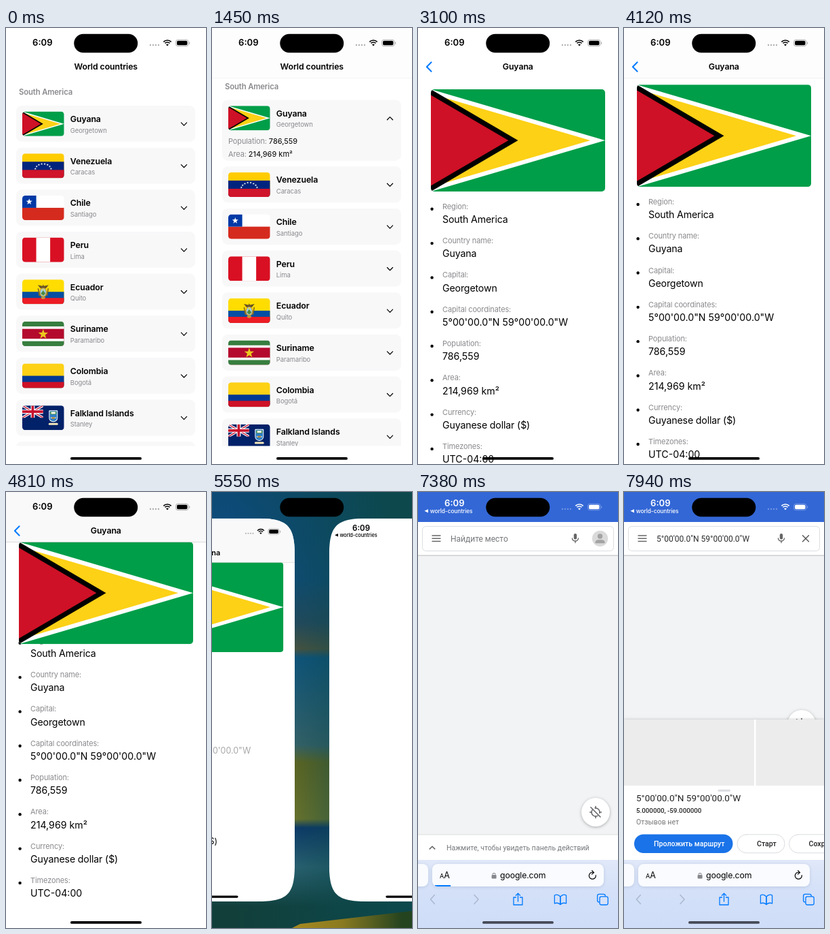
Recreate the animation shown at these times as an HTML page with a canvas. Size 295 by 640 pixels, loop 8 s.

```html
<!DOCTYPE html>
<html lang="en">
<head>
<meta charset="utf-8">
<title>World countries</title>
<style>
  html, body { margin: 0; width: 100%; height: 100%; overflow: hidden; background: #fff; }
  canvas { display: block; width: 295px; height: 640px; }
</style>
</head>
<body>
<canvas id="stage"></canvas>
<script>
const W = 295, H = 640, LOOP = 8000;
const canvas = document.getElementById('stage');
const dpr = window.devicePixelRatio || 1;
canvas.width = W * dpr;
canvas.height = H * dpr;
const c = canvas.getContext('2d');

const BLUE = '#007aff', GRAY = '#8a8a8e', INK = '#000';
const COORDS = '5°00\'00.0"N 59°00\'00.0"W';
const SANS = 'Inter, "Liberation Sans", sans-serif';
const ROBOTO = 'Roboto, "Liberation Sans", sans-serif';

// ---------- helpers ----------
const mix = (a, b, p) => a + (b - a) * p;
const clamp = v => Math.max(0, Math.min(1, v));
const easeOut = (p, n = 3) => 1 - Math.pow(1 - p, n);
const easeInOut = p => p * p * (3 - 2 * p);

// Number of steps (0..n) taken by time t, the first at a and the last at b.
function steps(t, a, b, n) {
  if (t < a) return 0;
  return Math.min(n, Math.floor((t - a) / (b - a) * (n - 1) + 0.2) + 1);
}

function rect(x, y, w, h, color) {
  c.fillStyle = color;
  c.fillRect(x, y, w, h);
}
function round(x, y, w, h, r, fill, stroke, lw = 1) {
  c.beginPath();
  c.roundRect(x, y, w, h, r);
  if (fill) { c.fillStyle = fill; c.fill(); }
  if (stroke) { c.strokeStyle = stroke; c.lineWidth = lw; c.stroke(); }
}
function poly(color, ...p) {
  c.beginPath();
  for (let i = 0; i < p.length; i += 2) c.lineTo(p[i], p[i + 1]);
  c.fillStyle = color;
  c.fill();
}
function line(color, lw, ...p) {
  c.beginPath();
  for (let i = 0; i < p.length; i += 2) c.lineTo(p[i], p[i + 1]);
  c.strokeStyle = color;
  c.lineWidth = lw;
  c.stroke();
}
function disc(x, y, r, color) {
  oval(x, y, r, r, color);
}
function oval(x, y, rx, ry, color) {
  c.beginPath();
  c.ellipse(x, y, rx, ry, 0, 0, 7);
  c.fillStyle = color;
  c.fill();
}
function ring(x, y, r, color, lw, a = 0, b = 2 * Math.PI) {
  c.beginPath();
  c.arc(x, y, r, a, b);
  c.strokeStyle = color;
  c.lineWidth = lw;
  c.stroke();
}
function star(x, y, r, color) {
  const p = [];
  for (let i = 0; i < 10; i++) {
    const a = i * Math.PI / 5 - Math.PI / 2, d = i % 2 ? r * 0.4 : r;
    p.push(x + d * Math.cos(a), y + d * Math.sin(a));
  }
  poly(color, ...p);
}
// Numbers are set a little wider than words.
function text(s, x, y, size, color = INK, weight = 400, align = 'left') {
  c.font = `${weight} ${size}px ${SANS}`;
  c.letterSpacing = (/\d\d/.test(s) ? 0 : -0.011 * size) + 'px';
  c.textAlign = align;
  c.fillStyle = color;
  c.fillText(s, x, y);
  return c.measureText(s).width;
}
function webText(s, x, y, size, color, weight = 400) {
  c.font = `${weight} ${size}px ${ROBOTO}`;
  c.letterSpacing = '0px';
  c.textAlign = 'left';
  c.fillStyle = color;
  c.fillText(s, x, y);
}
function scoped(draw) {
  c.save();
  draw();
  c.restore();
}
function shadow(color, blur, dy) {
  c.shadowColor = color;
  c.shadowBlur = blur * dpr;
  c.shadowOffsetY = dy * dpr;
}

// ---------- flags, drawn on a 62 x 36 field ----------
const FW = 62, FH = 36;
const bands = (...b) => {
  let y = 0;
  for (let i = 0; i < b.length; i += 2) {
    rect(0, y * FH, FW, FH - y * FH, b[i]);
    y += b[i + 1];
  }
};
const wedge = (color, top, tip) => poly(color, 0, top * FH, tip * FW, FH / 2, 0, FH - top * FH);

const flags = {
  guyana() {
    rect(0, 0, FW, FH, '#009e49');
    wedge('#fff', 0, 1);
    wedge('#fcd116', 0.043, 0.915);
    wedge('#000', 0, 0.5);
    wedge('#ce1126', 0.056, 0.445);
  },
  venezuela() {
    bands('#fc0', 1 / 3, '#00247d', 1 / 3, '#cf142b', 1 / 3);
    for (let i = 0; i < 8; i++) {
      const a = Math.PI * (1.08 + i * 0.12);
      star(31 + 12 * Math.cos(a), 24.5 + 9.5 * Math.sin(a), 1.7, '#fff');
    }
  },
  chile() {
    bands('#fff', 0.5, '#d52b1e', 0.5);
    rect(0, 0, 20.7, FH / 2, '#0039a6');
    star(10.3, 9.2, 4.8, '#fff');
  },
  peru() {
    rect(0, 0, FW, FH, '#d91023');
    rect(FW / 3, 0, FW / 3, FH, '#fff');
  },
  ecuador() {
    bands('#fd0', 0.5, '#034ea2', 0.25, '#ed1c24', 0.25);
    line('#8a6a1c', 1.6, 23.5, 13, 25.5, 24);
    line('#8a6a1c', 1.6, 38.5, 13, 36.5, 24);
    poly('#6b5426', 23, 8, 30, 9.5, 31, 7, 32, 9.5, 39, 8, 35, 13, 27, 13);
    oval(31, 19, 5.4, 7, '#c9a03a');
    oval(31, 18.6, 4, 5.4, '#9cd0ee');
    poly('#4d8a3c', 27.6, 20.5, 31, 16, 34.4, 20.5, 31, 23.6);
    disc(31, 15, 1.1, '#fd0');
    poly('#c9a03a', 27.5, 26, 34.5, 26, 33, 28.5, 29, 28.5);
  },
  suriname() {
    bands('#377e3f', 0.2, '#fff', 0.1, '#b40a2d', 0.4, '#fff', 0.1, '#377e3f', 0.2);
    star(31, 18.6, 7.6, '#ecc81d');
  },
  colombia() {
    bands('#fcd116', 0.5, '#003893', 0.25, '#ce1126', 0.25);
  },
  falkland() {
    rect(0, 0, FW, FH, '#012169');
    scoped(() => {
      c.beginPath();
      c.rect(0, 0, 31, 18);
      c.clip();
      for (const [color, lw] of [['#fff', 3.6], ['#c8102e', 1.3]]) {
        line(color, lw, 0, 0, 31, 18);
        line(color, lw, 31, 0, 0, 18);
      }
      for (const [color, lw] of [['#fff', 6], ['#c8102e', 3.6]]) {
        line(color, lw, 15.5, 0, 15.5, 18);
        line(color, lw, 0, 9, 31, 9);
      }
    });
    round(39.5, 7, 13, 17, [1, 1, 6, 6], '#fff');
    round(40.5, 8, 11, 15, [1, 1, 5, 5], '#2f7fc8');
    rect(41.5, 9, 9, 4, '#5f9a4a');
    rect(43, 9.5, 6, 2.6, '#fff');
    line('#fff', 1.2, 42, 18, 50, 18);
    poly('#b58b3c', 43, 17, 49, 17, 48, 19.5, 44, 19.5);
    round(39, 25.5, 14, 3, 1.5, '#f3e6b8');
  }
};

function flag(name, x, y, w, h, r) {
  scoped(() => {
    c.beginPath();
    c.roundRect(x, y, w, h, r);
    c.clip();
    c.translate(x, y);
    c.scale(w / FW, h / FH);
    flags[name]();
  });
}

// ---------- system chrome ----------
function statusBar(color, back) {
  text('6:09', 53.8, back ? 20.6 : 26.4, 13.1, color, 600, 'center');
  if (back) {
    poly(color, 9.5, 27.8, 15, 25.2, 15, 30.4);
    text('world-countries', 17.8, 30.6, 8.4, color, 500);
  }
  scoped(() => {
    c.globalAlpha *= 0.3;
    for (let i = 0; i < 4; i++) disc(213 + i * 4, 25, 1.2, color);
    round(250.5, 17.3, 18.4, 9.4, 3, null, color);
    rect(270, 20.5, 1.2, 3.2, color);
  });
  round(252, 18.8, 15.4, 6.4, 1.7, color);
  for (const r of [8, 5]) ring(238, 26, r, color, 1.7, -Math.PI * 0.75, -Math.PI * 0.25);
  poly(color, 238, 26.5, 236, 24.2, 238, 23.4, 240, 24.2);
}
const island = () => round(100.3, 8.7, 94, 27.5, 13.7, '#000');
const homeBar = (color = '#000') => round(95, 630, 105, 3.8, 2, color);

function navBar(alpha) {
  scoped(() => {
    c.globalAlpha *= alpha;
    rect(0, 0, W, 73, 'rgba(249,249,250,.97)');
    rect(0, 73, W, 0.7, '#cfcfd2');
  });
}

// ---------- country list ----------
const countries = [
  ['guyana', 'Guyana', 'Georgetown'], ['venezuela', 'Venezuela', 'Caracas'],
  ['chile', 'Chile', 'Santiago'], ['peru', 'Peru', 'Lima'],
  ['ecuador', 'Ecuador', 'Quito'], ['suriname', 'Suriname', 'Paramaribo'],
  ['colombia', 'Colombia', 'Bogotá'], ['falkland', 'Falkland Islands', 'Stanley']
];
const facts = [
  ['Population: ', '786,559'], ['Area: ', '214,969 km²'], ['Currency: ', 'Guyanese dollar ($)']
];

function countryCard([key, name, capital], y, extra) {
  scoped(() => {
    round(15, y, 264, 53 + extra, 8, '#f8f8f9');
    c.clip();
    flag(key, 24, y + 8.6, 61.7, 36.1, 4.5);
    text(name, 94.8, y + 24, 12.4, INK, 600);
    text(capital, 94.8, y + 39.8, 9.5, GRAY);
    const d = extra ? -2.1 : 2.1, m = y + 27;
    c.lineCap = c.lineJoin = 'round';
    line(INK, 1.2, 258.4, m - d, 262.5, m + d, 266.6, m - d);
    if (!extra) return;
    facts.forEach(([label, value], i) => {
      const by = y + 64.2 + i * 19.5;
      const w = text(label, 24, by, 11, GRAY);
      text(value, 24 + w, by, 11);
    });
    text('Learn more', 147.5, y + 142.4, 12.3, BLUE, 600, 'center');
  });
}

function listPage(open) {
  rect(0, 0, W, H, '#fff');
  scoped(() => {
    c.beginPath();
    c.rect(0, 0, W, 613.5);
    c.clip();
    const top = -25 * open, extra = 108 * open;
    text('South America', 19, 98 + top, 11.3, GRAY, 600);
    countries.forEach((item, i) =>
      countryCard(item, 114 + top + i * 61.65 + (i ? extra : 0), i ? 0 : extra));
    round(15, 607.2 + top + extra, 264, 53, 8, '#f8f8f9');
  });
  navBar(open);
}

// ---------- country details ----------
const rows = [
  ['Region:', 'South America'], ['Country name:', 'Guyana'], ['Capital:', 'Georgetown'],
  ['Capital coordinates:', COORDS], ['Population:', '786,559'], ['Area:', '214,969 km²'],
  ['Currency:', 'Guyanese dollar ($)'], ['Timezones:', 'UTC-04:00']
];

function detailPage(scroll, pressed) {
  rect(0, 0, W, H, '#fff');
  rows.forEach(([label, value], i) => {
    const y = 265.8 + i * 50.3 - scroll;
    disc(20.6, y, 2.2, INK);
    scoped(() => {
      if (pressed && i === 3) c.globalAlpha *= 0.35;
      text(label, 36, y, 11, GRAY);
      text(value, 36, y + 20.2, 14.2);
    });
  });
  flag('guyana', 19, Math.max(73.3, 90 - scroll), 257, 150, 5);
  navBar(clamp(scroll / 17));
}

function countriesApp(open, push, scroll, pressed) {
  scoped(() => {
    c.translate(-push * W * 0.3, 0);
    if (push < 1) listPage(open);
  });
  if (push > 0) scoped(() => {
    if (push < 1) rect(0, 0, W, H, `rgba(0,0,0,${0.1 * push})`);
    c.translate((1 - push) * W, 0);
    detailPage(scroll, pressed);
  });
  scoped(() => {
    c.globalAlpha *= 1 - push;
    text('World countries', 147.3 - push * 100, 61.3, 12.4, INK, 600, 'center');
  });
  if (push > 0) scoped(() => {
    c.globalAlpha *= push;
    text('Guyana', 147.3 + (1 - push) * 130, 61.3, 12.4, INK, 600, 'center');
    c.lineCap = c.lineJoin = 'round';
    line(BLUE, 2, 19.6, 50.2, 12.9, 57, 19.6, 63.8);
  });
  statusBar(INK, false);
  homeBar();
}

// ---------- switching apps ----------
function gradient(x, y, ...stops) {
  const g = c.createLinearGradient(0, 0, x, y);
  for (const [p, color] of stops) g.addColorStop(p, color);
  return g;
}

function wallpaper() {
  rect(0, 0, W, H, gradient(0, H,
    [0, '#0d4a74'], [0.2, '#0f4d86'], [0.3, '#2f4a66'], [0.36, '#6a5838'], [0.38, '#0f5a96'],
    [0.58, '#4d7078'], [0.62, '#8c7608'], [0.75, '#a08c18'], [0.77, '#0c2f78'],
    [0.86, '#3b6f86'], [0.95, '#123f3a']));
  rect(0, 0, W, H, gradient(W, 0, [0.1, 'rgba(12,72,76,0)'], [0.9, 'rgba(12,72,76,1)']));
  poly(gradient(W, 0, [0.4, '#a88a20'], [0.65, '#8a7a20'], [0.95, '#24431f']),
    118, H, 130, 634, W, 615, W, H);
}

// Rounded outline with continuous corners.
function squircle(r) {
  const e = r * 1.5, k = e * 0.187;
  const right = W - e, low = H - e;
  c.beginPath();
  c.moveTo(0, e);
  c.bezierCurveTo(0, k, k, 0, e, 0);
  c.lineTo(right, 0);
  c.bezierCurveTo(W - k, 0, W, k, W, e);
  c.lineTo(W, low);
  c.bezierCurveTo(W, H - k, W - k, H, right, H);
  c.lineTo(e, H);
  c.bezierCurveTo(k, H, 0, H - k, 0, low);
  c.closePath();
}

function appCard(cx, scale, draw) {
  scoped(() => {
    c.translate(cx, H / 2);
    c.scale(scale, scale);
    c.translate(-W / 2, -H / 2);
    squircle(42);
    c.clip();
    draw();
  });
}

function blankApp() {
  rect(0, 0, W, H, '#fff');
  statusBar(INK, true);
  homeBar();
}

function switchApps(u) {
  const e = easeOut(u), shift = easeOut(u, 4.5) * 310;
  const scale = 1 - 0.13 * 4 * e * (1 - e);
  wallpaper();
  appCard(W / 2 - shift, scale, () => countriesApp(1, 1, 44, true));
  appCard(W / 2 + 310 - shift, scale, blankApp);
}

// ---------- browser ----------
function browserBar(tint, progress) {
  rect(0, 540, W, 100, '#f7f7f9');
  scoped(() => {
    c.globalAlpha *= tint;
    c.translate(0, 540);
    rect(0, 0, W, 100, gradient(0, 100, [0, '#e0e8f9'], [0.5, '#d3e0f8'], [1, '#cfddf8']));
  });
  scoped(() => {
    shadow('rgba(40,60,110,.16)', 5, 1);
    round(21, 546, 253, 33, 8, '#f9fbff');
    round(-20, 546, 35, 33, 8, '#f9fbff');
  });
  if (progress) scoped(() => {
    c.beginPath();
    c.roundRect(21, 546, 253, 33, 8);
    c.clip();
    rect(25, 577, progress, 2, BLUE);
  });
  text('A', 32, 567.4, 9.2);
  text('A', 38.3, 567.4, 12.4);
  round(108.6, 562, 7, 5.6, 1, '#85878c');
  ring(112.1, 561.6, 2.1, '#85878c', 1.1, Math.PI, 0);
  text('google.com', 121, 567.4, 12.3);

  c.lineCap = c.lineJoin = 'round';
  ring(257.3, 563.2, 5, INK, 1.2, -0.1, Math.PI * 1.65);
  line(INK, 1.2, 256.6, 555.6, 259.4, 558.6, 256.4, 561);

  line('#a9b6cc', 1.4, 24.4, 591.5, 18.4, 598, 24.4, 604.5);
  line('#a9b6cc', 1.4, 83, 591.5, 89, 598, 83, 604.5);
  line(BLUE, 1.3, 144.5, 595, 141, 595, 141, 606, 154, 606, 154, 595, 150.5, 595);
  line(BLUE, 1.3, 147.5, 601, 147.5, 589.3);
  line(BLUE, 1.3, 144.4, 592.2, 147.5, 589.1, 150.6, 592.2);
  for (const d of [-1, 1]) {
    c.beginPath();
    c.moveTo(210, 594);
    c.quadraticCurveTo(210 + d * 4, 589.5, 210 + d * 8.6, 592);
    c.lineTo(210 + d * 8.6, 604);
    c.quadraticCurveTo(210 + d * 4, 602, 210, 605.5);
    c.closePath();
    c.stroke();
  }
  round(264.6, 590.3, 11.6, 11.6, 2.5, null, BLUE, 1.3);
  round(268, 593.8, 12.2, 12.2, 2.5, '#d6e2f8', BLUE, 1.3);
}

function mapHeader(found) {
  rect(0, 44, W, 49, '#fff');
  rect(0, 92.5, W, 1.5, '#cdcfd0');
  round(6.5, 50.5, 282, 36, 5, '#fff', '#dcdee0');
  for (const y of [64, 68.2, 72.4]) line('#666', 1.5, 20.5, y, 33.5, y);
  webText(found ? COORDS : 'Найдите место', 48, 72.6, 12, found ? '#2c2d2f' : '#76787b');
  c.lineCap = 'round';
  round(229.8, 61, 4.4, 8.6, 2.2, '#666');
  ring(232, 67.4, 4.6, '#666', 1.3, 0.1, Math.PI - 0.1);
  line('#666', 1.3, 232, 72.2, 232, 74.6);
  if (found) {
    line('#555', 1.4, 263.5, 63.8, 272.5, 72.8);
    line('#555', 1.4, 272.5, 63.8, 263.5, 72.8);
  } else {
    disc(268.5, 68.3, 11.6, '#dadada');
    disc(268.5, 65, 3.7, '#a3a3a3');
    round(261.4, 70.2, 14.2, 5, [5, 5, 1, 1], '#a3a3a3');
  }
}

function locateButton(y) {
  scoped(() => {
    shadow('rgba(0,0,0,.3)', 4, 1);
    disc(262, y, 21, '#fff');
  });
  ring(262, y, 6, '#5f6164', 1.5);
  for (let i = 0; i < 4; i++) {
    const x = Math.cos(i * Math.PI / 2), v = Math.sin(i * Math.PI / 2);
    line('#5f6164', 1.5, 262 + x * 6, y + v * 6, 262 + x * 8.4, y + v * 8.4);
  }
  line('#fff', 3.4, 256, y - 8, 269, y + 6);
  line('#5f6164', 1.5, 254.8, y - 7.2, 269, y + 7);
}

function placePanel(top) {
  scoped(() => {
    c.translate(0, top - 334);
    scoped(() => {
      shadow('rgba(0,0,0,.22)', 4, 0);
      rect(0, 334, W, 206, '#fff');
    });
    rect(0, 334, 192, 97, '#ececed');
    rect(194.5, 334, 101, 97, '#ececed');
    round(138.5, 436.8, 18.5, 3, 1.5, '#dadce0');
    webText(COORDS, 18, 454, 13.5, '#222');
    webText('5.000000, -59.000000', 18, 471.2, 9.75, '#222', 500);
    webText('Отзывов нет', 18, 487.6, 10.5, '#777');
    round(15, 502.5, 145.5, 27.5, 13.75, '#1a73e8');
    webText('Проложить маршрут', 44, 519.6, 10.6, '#fff', 500);
    round(167, 502.8, 70, 27, 13.5, '#fff', '#dadce0');
    webText('Старт', 196, 519.6, 10.6, '#222', 500);
    round(243.5, 502.8, 110, 27, 13.5, '#fff', '#dadce0');
    webText('Сохранить', 272.5, 519.6, 10.6, '#222', 500);
  });
}

function mapPage(rise) {
  rect(0, 44, W, 496, '#f1f3f4');
  c.lineCap = 'round';
  locateButton(mix(470, 341, rise));
  if (rise) {
    scoped(() => {
      c.beginPath();
      c.rect(0, 44, W, 496);
      c.clip();
      placePanel(mix(503, 334, rise));
    });
  } else {
    rect(0, 503, W, 37, '#fff');
    rect(0, 502.5, W, 1, '#dddfe0');
    c.lineCap = 'butt';
    line('#666', 1.5, 16.8, 524.4, 21, 520.2, 25.2, 524.4);
    webText('Нажмите, чтобы увидеть панель действий', 42, 525.8, 10.55, '#76787b');
  }
  c.lineCap = 'butt';
  mapHeader(rise > 0);
}

function browser(t) {
  const shown = steps(t, 6350, 6700, 4) / 4;
  const load = steps(t, 6840, 7600, 8);
  const rise = steps(t, 7710, 7940, 3) / 3;
  const theme = clamp((load - 3) / 2);
  rect(0, 0, W, H, '#fff');
  if (theme) {
    scoped(() => {
      c.globalAlpha = theme;
      rect(0, 0, W, 44, '#3367d6');
    });
    scoped(() => mapPage(rise));
  }
  scoped(() => {
    c.globalAlpha = shown;
    browserBar(theme, rise ? 0 : load * 3.85);
  });
  statusBar(theme ? '#fff' : INK, true);
  homeBar(shown < 1 ? '#000' : '#454b57');
}

// ---------- timeline ----------
function draw(t) {
  c.setTransform(dpr, 0, 0, dpr, 0, 0);
  const swap = steps(t, 5430, 6230, 8);
  if (swap === 8) browser(t);
  else if (swap > 1) switchApps((swap - 1) / 7);
  else {
    const open = steps(t, 1450, 1680, 3) / 3;
    const push = easeOut(Math.max(0, steps(t, 2530, 3100, 6) - 1) / 5);
    const scroll = 44 * easeInOut(steps(t, 4010, 4810, 8) / 8);
    countriesApp(open, push, scroll, swap === 1);
  }
  island();
}

const start = performance.now();
function tick() {
  draw((performance.now() - start) % LOOP);
  requestAnimationFrame(tick);
}
tick();
</script>
</body>
</html>
```
